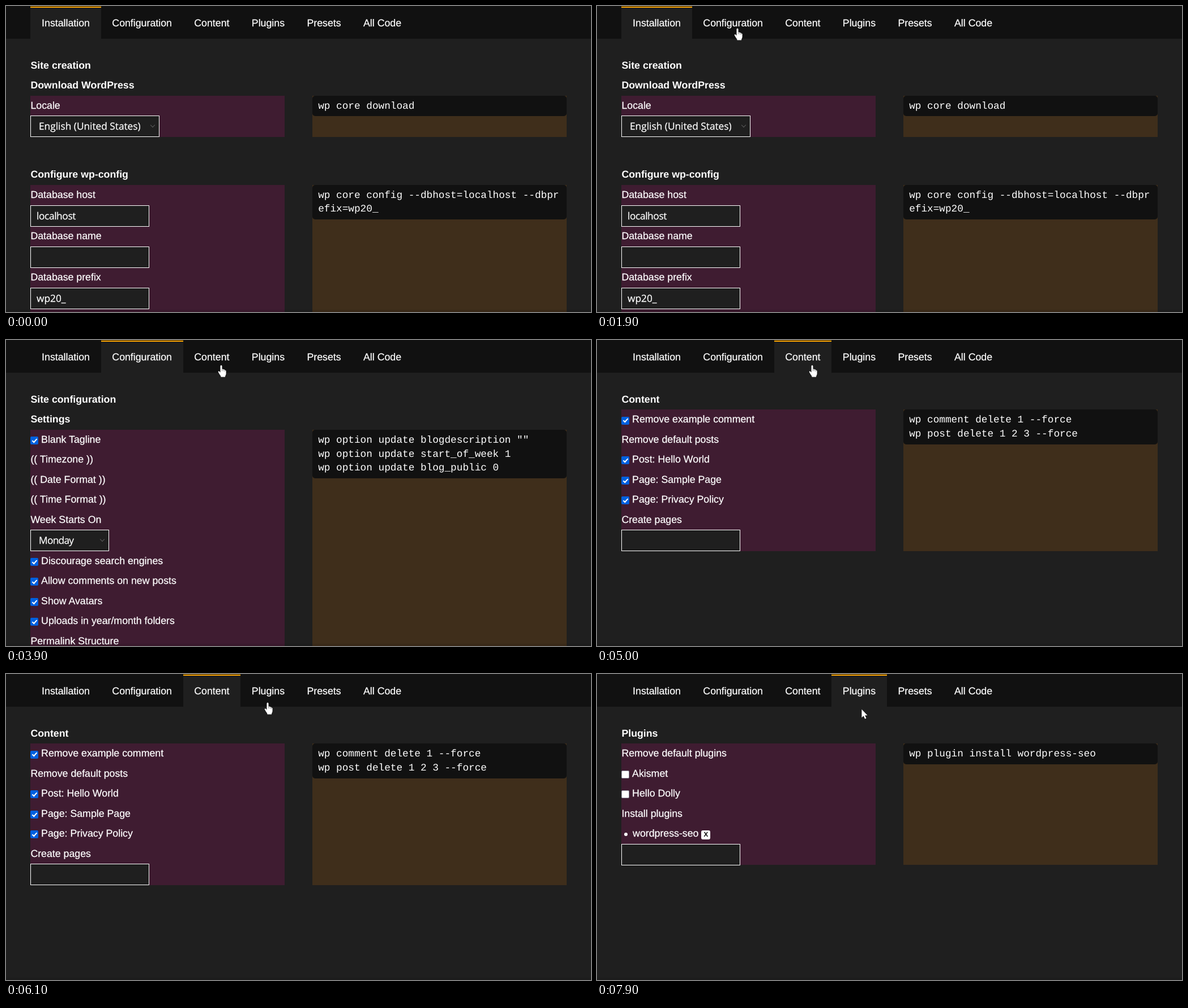
Animation of 1033x542 px, one loop 8 s. Source, as an HTML page:

```html
<!DOCTYPE html>
<html lang="en">
<head>
<meta charset="utf-8">
<title>Site setup</title>
<style>
  html, body { margin: 0; width: 100%; height: 100%; overflow: hidden; background: #1f1f1f; }
  body {
    position: relative;
    font: 17.76px/35.46px "Liberation Sans", Arial, sans-serif;
    color: #fff;
    text-rendering: geometricPrecision;
    -webkit-text-stroke: .25px #fff;
    white-space: pre;
  }

  nav { position: absolute; inset: 0 0 auto; height: 58px; padding-left: 43.4px; display: flex; background: #111; }
  nav span { position: relative; isolation: isolate; padding: 0 19.7px; line-height: 60px; }
  nav i { position: absolute; z-index: -1; inset: 1px 0 0; border-top: 2px solid #ffa500; background: #1f1f1f; height: 55px; }

  section { position: absolute; inset: 0; }
  section > * { position: absolute; left: 43.4px; box-sizing: border-box; }
  b { font-weight: 700; -webkit-text-stroke: 0; }
  .form, .side { width: 448.4px; }
  .form { background: #3f1c31; }
  .side { left: 541.2px; background: #3f2e1b; }
  pre {
    margin: 0; padding: 7px 10px 4.6px; border-radius: 5px; background: #111;
    font: 17.73px/24.82px "Liberation Mono", "Courier New", monospace;
    -webkit-text-stroke: 0;
  }

  .box {
    left: 43px; width: 210px; height: 38px; padding-left: 10px;
    border: 1px solid #fff; background: #1f1f1f;
    font: 17.3px/37px "Open Sans", "Noto Sans", sans-serif;
  }
  .pick { padding-left: 14px; }
  .pick::after {
    content: ""; position: absolute; right: 8px; top: 13px; width: 5px; height: 5px;
    border: solid #5c5c5c; border-width: 0 1px 1px 0; transform: rotate(45deg);
  }

  .check { padding-left: 18.7px; }
  .check::before {
    content: ""; position: absolute; left: 0; top: 12.3px; width: 14px; height: 14px;
    border-radius: 2px; background: #0060df;
  }
  .check::after {
    content: ""; position: absolute; left: 4.8px; top: 14px; width: 3.2px; height: 7px;
    border: solid #fff; border-width: 0 2px 2px 0; transform: rotate(42deg);
  }
  .off::before { box-sizing: border-box; background: #fff; border: 1px solid #8f8f9d; }
  .off::after { display: none; }

  .item { padding-left: 19.7px; }
  .item::before {
    content: ""; position: absolute; left: 5px; top: 15.5px; width: 6px; height: 6px;
    border-radius: 50%; background: #fff;
  }
  .item u {
    position: absolute; left: 141px; top: 12px; width: 16px; height: 16px; border-radius: 3px;
    background: #fff; color: #111; text-decoration: none; text-align: center;
    font: 700 11.5px/15.5px "Open Sans", sans-serif;
    -webkit-text-stroke: 0;
  }
  .edge { position: absolute; inset: auto 0 0; height: 4px; background: rgba(0, 0, 0, .1); }

  .p1, .p2, .p3, .p4 { visibility: hidden; animation: 8s step-end infinite; }
  .p1 { animation-name: p1; }
  .p2 { animation-name: p2; }
  .p3 { animation-name: p3; }
  .p4 { animation-name: p4; }
  @keyframes p1 { 0% { visibility: visible } 38.75%, 100% { visibility: hidden } }
  @keyframes p2 { 0% { visibility: hidden } 38.75% { visibility: visible } 62.5%, 100% { visibility: hidden } }
  @keyframes p3 { 0% { visibility: hidden } 62.5% { visibility: visible } 95%, 100% { visibility: hidden } }
  @keyframes p4 { 0% { visibility: hidden } 95%, 100% { visibility: visible } }

  /* The pointer moves once every 100 ms: a slide in, then two dips below the tabs. */
  #pointer { position: absolute; left: 0; top: 0; width: 0; height: 0; animation: move 8s step-end infinite; }
  #pointer svg { position: absolute; left: 0; top: 0; overflow: visible; animation: 8s step-end infinite; }
  #pointer path { paint-order: stroke; stroke: #111; }
  #pointer .hand { left: -7px; animation-name: hand; }
  #pointer .arrow { animation-name: arrow; }
  @keyframes move {
    0%     { transform: translate(-60px, 77px) }
    13.75% { transform: translate(25px, 77px) }
    15%    { transform: translate(60px, 75px) }
    16.25% { transform: translate(98px, 72px) }
    17.5%  { transform: translate(134px, 68px) }
    18.75% { transform: translate(167px, 63px) }
    20%    { transform: translate(195px, 56px) }
    21.25% { transform: translate(219px, 49px) }
    22.5%  { transform: translate(238px, 43px) }
    23.75% { transform: translate(249px, 39px) }
    42.5%  { transform: translate(254px, 43px) }
    43.75% { transform: translate(273px, 62px) }
    45%    { transform: translate(301px, 74px) }
    46.25% { transform: translate(331px, 72px) }
    47.5%  { transform: translate(360px, 60px) }
    48.75% { transform: translate(381px, 44px) }
    71.25% { transform: translate(386px, 53px) }
    72.5%  { transform: translate(404px, 72px) }
    73.75% { transform: translate(428px, 78px) }
    75%    { transform: translate(450px, 67px) }
    76.25% { transform: translate(463px, 50px) }
    98.75%, 100% { transform: translate(467px, 62px) }
  }
  @keyframes hand {
    0% { opacity: 0 } 20% { opacity: 1 } 43.75% { opacity: 0 } 48.75% { opacity: 1 }
    72.5% { opacity: 0 } 76.25% { opacity: 1 } 98.75%, 100% { opacity: 0 }
  }
  @keyframes arrow {
    0% { opacity: 1 } 20% { opacity: 0 } 43.75% { opacity: 1 } 48.75% { opacity: 0 }
    72.5% { opacity: 1 } 76.25% { opacity: 0 } 98.75%, 100% { opacity: 1 }
  }
</style>
</head>
<body>
<nav><span><i class="p1"></i>Installation</span><span><i class="p2"></i>Configuration</span><span><i class="p3"></i>Content</span><span><i class="p4"></i>Plugins</span><span>Presets</span><span>All Code</span></nav>

<section class="p1">
  <b style="top:87.8px">Site creation</b>
  <b style="top:123.3px">Download WordPress</b>
  <div class="form" style="top:158.8px;height:73px"></div>
  <div style="top:158.8px">Locale</div>
  <div class="box pick" style="top:194px;width:228px">English (United States)</div>
  <div class="side" style="top:158.8px;height:73px"><pre>wp core download</pre></div>
  <b style="top:281px">Configure wp-config</b>
  <div class="form" style="top:316.5px;bottom:0"></div>
  <div style="top:316.5px">Database host</div>
  <div class="box" style="top:353px;letter-spacing:-.38px">localhost</div>
  <div style="top:390px">Database name</div>
  <div class="box" style="top:426px"></div>
  <div style="top:463.2px">Database prefix</div>
  <div class="box" style="top:499px">wp20_</div>
  <div class="side" style="top:316.5px;bottom:0"><pre>wp core config --dbhost=localhost --dbpr
efix=wp20_</pre></div>
</section>

<section class="p2">
  <b style="top:87.8px">Site configuration</b>
  <b style="top:123.3px">Settings</b>
  <div class="form" style="top:158.8px;bottom:0"></div>
  <div class="check" style="top:158.8px">Blank Tagline</div>
  <div style="top:194.2px">(( Timezone ))</div>
  <div style="top:229.7px">(( Date Format ))</div>
  <div style="top:265.1px">(( Time Format ))</div>
  <div style="top:300.6px">Week Starts On</div>
  <div class="box pick" style="top:336px;width:139px;letter-spacing:-.7px">Monday</div>
  <div class="check" style="top:373.8px">Discourage search engines</div>
  <div class="check" style="top:409.2px">Allow comments on new posts</div>
  <div class="check" style="top:444.7px">Show Avatars</div>
  <div class="check" style="top:480.1px">Uploads in year/month folders</div>
  <div style="top:515.6px">Permalink Structure</div>
  <div class="side" style="top:158.8px;bottom:0"><pre>wp option update blogdescription ""
wp option update start_of_week 1
wp option update blog_public 0</pre></div>
</section>

<section class="p3">
  <b style="top:87.8px">Content</b>
  <div class="form" style="top:123.3px;height:250.4px"></div>
  <div class="check" style="top:123.3px">Remove example comment</div>
  <div style="top:158.8px">Remove default posts</div>
  <div class="check" style="top:194.2px">Post: Hello World</div>
  <div class="check" style="top:229.7px">Page: Sample Page</div>
  <div class="check" style="top:265.1px">Page: Privacy Policy</div>
  <div style="top:300.6px">Create pages</div>
  <div class="box" style="top:336px"></div>
  <div class="side" style="top:123.3px;height:250.4px"><pre>wp comment delete 1 --force
wp post delete 1 2 3 --force</pre></div>
</section>

<section class="p4">
  <b style="top:87.8px">Plugins</b>
  <div class="form" style="top:123.3px;height:214.7px"></div>
  <div style="top:123.3px">Remove default plugins</div>
  <div class="check off" style="top:158.8px">Akismet</div>
  <div class="check off" style="top:194.2px">Hello Dolly</div>
  <div style="top:229.7px">Install plugins</div>
  <div class="item" style="top:265.1px">wordpress-seo<u>X</u></div>
  <div class="box" style="top:300.6px"></div>
  <div class="side" style="top:123.3px;height:214.7px"><pre>wp plugin install wordpress-seo</pre></div>
</section>

<div class="edge"></div>

<div id="pointer">
  <svg class="hand" width="16" height="22"><path d="M4.5 2.5C4.5.3 7.5.3 7.5 2.5V8C8.5 7.2 10 7.6 10.2 8.6C11.3 8 12.4 8.6 12.5 9.6C13.6 9.2 14.6 10 14.6 11.2V15.5C14.6 18 13 19 13 21.5H5.5C5.5 19.5 3.5 17.5 2.6 16L.8 12.8C.2 11.4 2 10.6 3 11.8L4.5 13.6Z" fill="#fff" stroke-width="1.2"/><path d="M7.6 8V11M10.2 8.8V11.3M12.5 9.8V11.8" stroke-width=".5"/></svg>
  <svg class="arrow" width="12" height="18"><path d="M.4.4V15.2L3.7 12.2L6.1 17.6L8.5 16.6L6.2 11.2H10.6Z" fill="#fff" stroke-width="1"/></svg>
</div>
</body>
</html>
```
